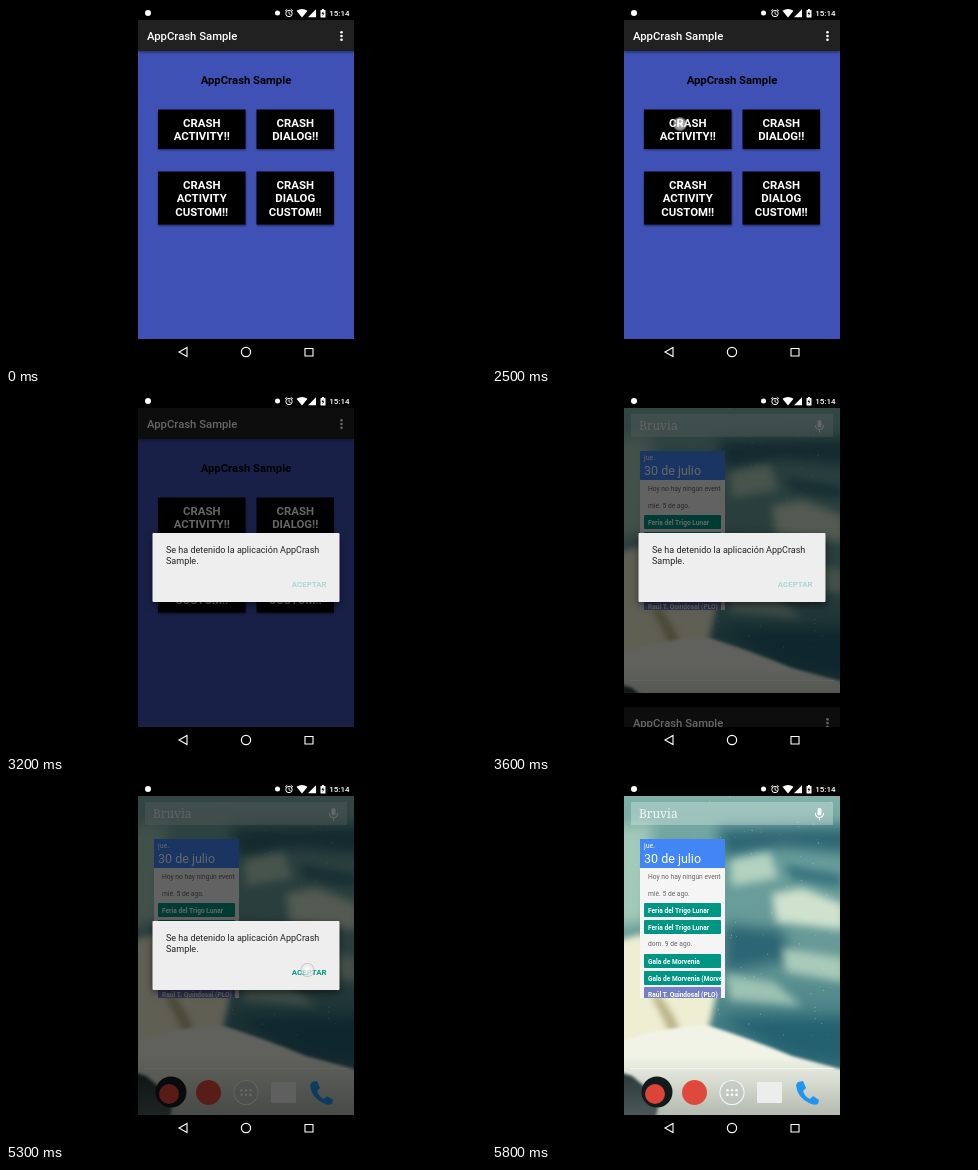
An HTML page with a canvas for the animation above (5900 ms loop, 480 by 360 pixels).

```html
<!DOCTYPE html>
<html lang="es">
<head>
<meta charset="utf-8">
<style>
  html, body { margin: 0; width: 100%; height: 100%; overflow: hidden; background: #000; }
  canvas { display: block; width: 480px; height: 360px; }
</style>
</head>
<body>
<canvas id="stage" width="480" height="360"></canvas>
<script>
const LOOP = 5900, STEP = 100;
const LEFT = 132, WIDTH = 216, TOP = 14, BOTTOM = 333;
const stage = document.getElementById('stage');
const screen = stage.getContext('2d');
let ctx = screen;

const clamp = v => Math.max(0, Math.min(1, v));
const ramp = (t, from, to) => clamp((t - from) / (to - from));
const smooth = p => p * p * (3 - 2 * p);

function rect(x, y, w, h, color, radius = 0) {
  ctx.fillStyle = color;
  ctx.beginPath();
  ctx.roundRect(x, y, w, h, radius);
  ctx.fill();
}
function disc(x, y, r, color) {
  ctx.fillStyle = color;
  ctx.beginPath();
  ctx.arc(x, y, r, 0, 7);
  ctx.fill();
}
function ring(x, y, r, color, width = 1) {
  ctx.strokeStyle = color;
  ctx.lineWidth = width;
  ctx.beginPath();
  ctx.arc(x, y, r, 0, 7);
  ctx.stroke();
}
function shape(path, color) {
  ctx.fillStyle = color;
  ctx.fill(new Path2D(path));
}
function outline(path, color, width = 1) {
  ctx.strokeStyle = color;
  ctx.lineWidth = width;
  ctx.stroke(new Path2D(path));
}
function text(str, x, y, size, color, weight = 400, align = 'left', family = 'Roboto, sans-serif') {
  ctx.font = `${weight} ${size}px ${family}`;
  ctx.textAlign = align;
  ctx.fillStyle = color;
  ctx.fillText(str, x, y);
}
function shadow(color, blur, dy) {
  ctx.shadowColor = color;
  ctx.shadowBlur = blur;
  ctx.shadowOffsetY = dy;
}

// Soft snowy landscape, painted once
function paintWallpaper() {
  const canvas = document.createElement('canvas');
  canvas.width = 480;
  canvas.height = 360;
  ctx = canvas.getContext('2d');
  ctx.beginPath();
  ctx.rect(LEFT, 0, WIDTH, 360);
  ctx.clip();
  const sky = ctx.createLinearGradient(0, TOP, 0, BOTTOM);
  [[0, '#7fb0a8'], [.2, '#6a9f9c'], [.5, '#679a97'], [.75, '#3f7a82'], [1, '#2d6470']]
    .forEach(([at, color]) => sky.addColorStop(at, color));
  rect(LEFT, 0, WIDTH, 360, sky);

  ctx.filter = 'blur(7px)';
  shape('M225 46 L360 44 L360 72 L290 66 L232 76Z', '#2d6673');
  shape('M120 45 L160 40 L155 140 L120 145Z', '#a3c9b8');
  shape('M232 142 L290 148 L300 178 L232 190Z', '#2c6573');
  shape('M225 235 L360 235 L360 285 L300 275Z', '#24616f');
  ctx.filter = 'blur(4px)';
  shape('M238 78 L278 70 L286 96 L240 104Z', '#b3d2bf');
  shape('M292 82 L350 92 L350 106 L300 98Z', '#3b7580');
  shape('M280 112 L310 106 L352 122 L352 148 L284 140Z', '#cfe2cd');
  shape('M290 166 L352 176 L352 200 L294 190Z', '#a9cab8');
  shape('M234 192 L282 200 L310 224 L238 218Z', '#9cc2b2');
  ctx.filter = 'blur(3px)';
  shape('M120 160 L150 152 L180 190 L226 205 L217 246 L178 262 L120 268Z', '#eeeed2');
  shape('M166 212 Q184 232 190 256 L180 258 Q172 236 160 216Z', '#b9b389');
  ctx.filter = 'blur(1.5px)';
  shape('M120 262 Q165 246 212 242 Q262 258 300 274 L360 290 L360 350 L120 350Z', '#f0f3e6');
  shape('M120 288 L140 294 L152 304 L166 326 L160 350 L120 350Z', '#1c2d30');
  ctx.filter = 'none';
  const shade = ctx.createLinearGradient(0, 275, 0, BOTTOM);
  shade.addColorStop(0, 'rgba(120,130,125,0)');
  shade.addColorStop(1, 'rgba(120,130,125,.5)');
  rect(LEFT, 275, WIDTH, 60, shade);

  let seed = 7;
  const random = () => (seed = seed * 16807 % 2147483647) / 2147483647;
  for (let i = 0; i < 130; i++) {
    disc(LEFT + random() * WIDTH, TOP + random() * 250, .3 + random() * .4, 'rgba(225,245,240,.4)');
  }
  ctx = screen;
  return canvas;
}
const wallpaper = paintWallpaper();

function drawAgenda() {
  rect(148, 57, 85, 29, '#4285f4');
  rect(148, 86, 85, 130, '#f5f5f5');
  text('jue.', 152, 65.5, 7, '#fff');
  text('30 de julio', 152, 81, 12.5, '#fff');
  ctx.save();
  ctx.beginPath();
  ctx.rect(148, 86, 81, 130);
  ctx.clip();
  [['Hoy no hay ningún evento', 97], ['mié. 5 de ago.', 114], ['dom. 9 de ago.', 164]]
    .forEach(([label, y]) => text(label, 156, y, 6.7, '#666'));
  [['Feria del Trigo Lunar', 121], ['Feria del Trigo Lunar', 138], ['Gala de Morvenia', 172],
   ['Gala de Morvenia (Morvenia)', 189], ['Raúl T. Quindosal (PLO)', 205, '#7580c6']]
    .forEach(([label, y, color = '#009683']) => {
      rect(152, y, 77, 14, color, 1);
      text(label, 156, y + 9.6, 6.6, '#fff', 700);
    });
  ctx.restore();
}

function drawDock() {
  disc(165, 310, 15.5, '#111b1c');
  disc(163, 312, 10, '#dc4437');
  disc(202.5, 310.5, 12.5, '#df493d');
  ring(240, 310.5, 12, '#f2f5f4', 1.2);
  disc(240, 310.5, 11.4, 'rgba(190,196,192,.6)');
  for (let i = 0; i < 6; i++) disc(235.5 + i % 3 * 4.5, 308.3 + (i > 2) * 4.5, 1.3, '#fff');
  rect(265, 300, 25, 21, '#eceeed', 1);
  shape('M306 300 L311 299 L314 306 L311 309 Q313 315 318 317 L321 314 L327 318 L326 322 Q322 324 317 321 Q305 315 304 303Z', '#2094ee');
}

function drawHome(withDock) {
  ctx.drawImage(wallpaper, 0, 0);
  rect(139, 20, 202, 23, 'rgba(235,245,243,.32)', 1);
  text('Bruvia', 147, 36, 12, '#f4f7f6', 400, 'left', '"Noto Serif", serif');
  rect(325.5, 26, 4, 7.5, '#fff', 2);
  outline('M323.5 31 Q323.5 35.5 327.5 35.5 Q331.5 35.5 331.5 31 M327.5 35.5 V38.5', '#fff', 1.1);
  drawAgenda();
  rect(138, 286, 204, 1, 'rgba(255,255,255,.65)');
  if (withDock) drawDock();
}

function drawButton(x, y, w, h, lines) {
  ctx.save();
  shadow('rgba(0,0,0,.45)', 2, 1);
  rect(x, y, w, h, '#000');
  ctx.restore();
  lines.forEach((line, i) => text(line, x + w / 2, y + 17.8 + i * 13.1, 11.4, '#fff', 700, 'center'));
}

function drawApp(offset) {
  ctx.save();
  ctx.translate(0, offset);
  rect(LEFT, 0, WIDTH, BOTTOM, '#000');
  rect(LEFT, 45, WIDTH, 288, '#3f51b5');
  ctx.save();
  shadow('rgba(0,0,0,.5)', 3, 1);
  rect(LEFT, TOP, WIDTH, 31, '#212121');
  ctx.restore();
  text('AppCrash Sample', 141, 34.3, 11.3, '#fff', 500);
  [26.3, 30, 33.7].forEach(y => disc(335.5, y, 1.3, '#fff'));
  text('AppCrash Sample', 240, 78, 11.3, '#000', 700, 'center');
  drawButton(152, 103.5, 87.5, 39.5, ['CRASH', 'ACTIVITY!!']);
  drawButton(250.5, 103.5, 77.5, 39.5, ['CRASH', 'DIALOG!!']);
  drawButton(152, 165.5, 87.5, 53, ['CRASH', 'ACTIVITY', 'CUSTOM!!']);
  drawButton(250.5, 165.5, 77.5, 53, ['CRASH', 'DIALOG', 'CUSTOM!!']);
  ctx.restore();
}

function drawDialog(opacity, enabled) {
  ctx.save();
  ctx.globalAlpha = opacity;
  rect(LEFT, TOP, WIDTH, BOTTOM - TOP, 'rgba(0,0,0,.6)');
  ctx.save();
  shadow('rgba(0,0,0,.5)', 7, 3);
  rect(146.5, 139, 187, 69, '#eee', 1);
  ctx.restore();
  text('Se ha detenido la aplicación AppCrash', 160, 159, 9, '#212121');
  text('Sample.', 160, 170, 9, '#212121');
  text('ACEPTAR', 320.5, 193.2, 7.9, enabled ? '#009688' : '#a9dad3', 700, 'right');
  ctx.restore();
}

function drawTouch(x, y, opacity) {
  ctx.save();
  ctx.globalAlpha = opacity;
  const glow = ctx.createRadialGradient(x, y, 1, x, y, 7.5);
  glow.addColorStop(0, 'rgba(255,255,255,.75)');
  glow.addColorStop(.7, 'rgba(235,235,235,.6)');
  glow.addColorStop(.85, 'rgba(170,170,170,.5)');
  glow.addColorStop(1, 'rgba(150,150,150,0)');
  disc(x, y, 7.5, glow);
  ctx.restore();
}

function drawSystemBars() {
  rect(LEFT, 0, WIDTH, TOP, '#000');
  rect(LEFT, BOTTOM, WIDTH, 27, '#000');
  disc(142, 7, 3, '#fff');
  disc(271.5, 7, 2.5, '#fff');
  ring(283, 7.5, 3.2, '#fff');
  outline('M283 5.5 V7.7 L284.6 8.6 M279 5 L281.2 3.2 M287 5 L284.8 3.2', '#fff', .9);
  shape('M290.5 4.8 Q296 1 301.5 4.8 L296 11.5Z', '#fff');
  shape('M302 11.3 H310 V3.3Z', '#fff');
  rect(314.5, 4, 5, 7.5, '#fff', .5);
  rect(316, 3, 2, 1.5, '#fff');
  shape('M317.4 5 L315.6 8 H316.8 L316.5 10.3 L318.4 7.2 H317.2Z', '#000');
  text('15:14', 343.5, 10.3, 8, '#fff', 500, 'right');
  outline('M181 341.5 V350.5 L173 346Z', '#fff', 1.1);
  ring(240, 346, 4.6, '#fff', 1.2);
  outline('M299 342.5 H307 V350 H299Z', '#fff', 1.1);
}

function draw(t) {
  rect(0, 0, 480, 360, '#000');
  const slide = smooth(ramp(t, 3450, 3637));
  if (slide > 0) drawHome(slide === 1);
  if (slide < 1) drawApp(BOTTOM * slide);

  const dialog = ramp(t, 2650, 2950) * (1 - ramp(t, 5450, 5750));
  if (dialog > 0) drawDialog(dialog, t >= 3800);
  drawSystemBars();

  if (t >= 2500 && t < 2800) drawTouch(188, 118, 1 - ramp(t, 2550, 2800));
  if (t >= 5300 && t < 5600) drawTouch(301.5, 188, 1 - ramp(t, 5350, 5600));
}

const start = performance.now();
function tick() {
  const t = (performance.now() - start) % LOOP;
  draw(Math.floor(t / STEP) * STEP);
  requestAnimationFrame(tick);
}
tick();
</script>
</body>
</html>
```
